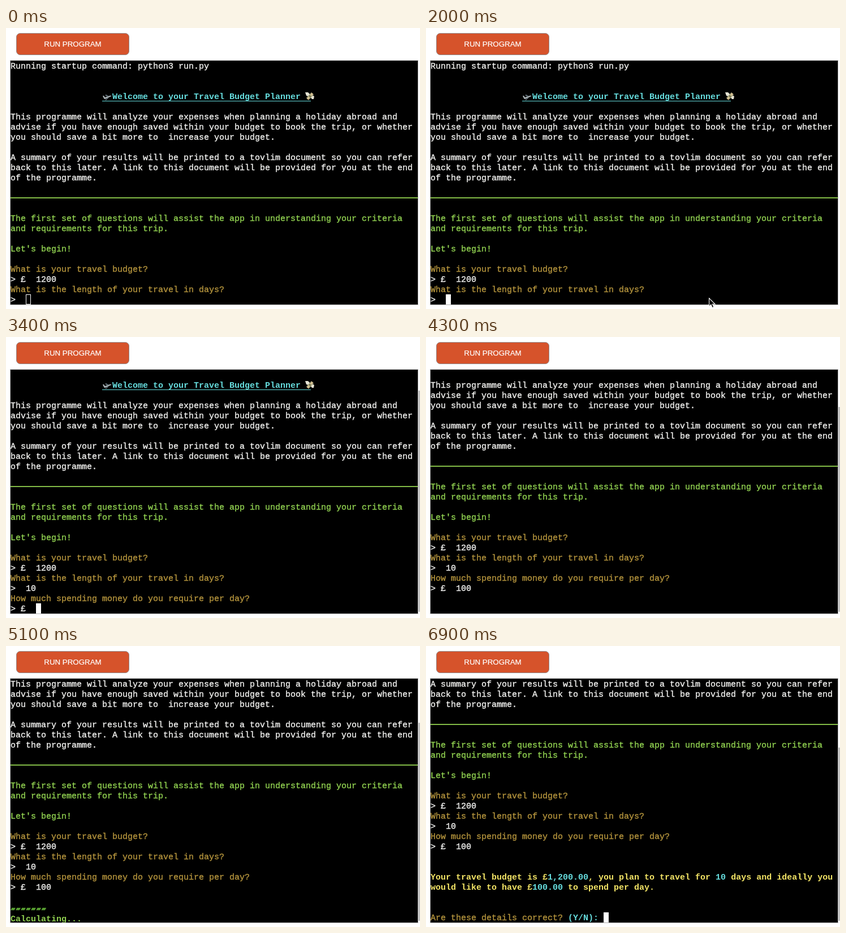
An HTML page for the animation above (7 s loop, 732 px wide and 498 px high).

```html
<!DOCTYPE html>
<html lang="en">
<head>
<meta charset="utf-8">
<title>Travel Budget Planner</title>
<style>
  html, body { margin: 0; width: 100%; height: 100%; overflow: hidden; background: #fff; }
  #stage { position: relative; width: 732px; height: 498px; overflow: hidden; }
  #stage div, #stage svg { position: absolute; }
  #button {
    left: 18px; top: 9px; width: 200px; height: 39px; box-sizing: border-box;
    border: 1px solid #90898b; border-radius: 7px; background: #d6532b;
    color: #fff; font: 13.333px/37px "Liberation Sans", Arial, sans-serif; text-align: center;
    -webkit-text-stroke: .2px;
  }
  #terminal { left: 8px; top: 58px; width: 720px; height: 432px; overflow: hidden; background: #000; }
  #edge { left: 7px; top: 57px; width: 720px; height: 432px; border: 1px solid #b4b4b4; }
  #scroller { left: 0; top: 0; width: 720px; }
  pre {
    position: relative; top: 2px; margin: 0; color: #f0f0ee;
    font: 15px/18px "Liberation Mono", "Courier New", monospace; -webkit-text-stroke: .4px;
  }
  b { -webkit-text-stroke: 0; }
  .green { color: #90d050; }
  .gold { color: #b2923c; }
  .cyan { color: #66dcdd; }
  .yellow { color: #f4e566; }
  .bar { color: #569b30; font-family: "DejaVu Sans Mono", monospace; -webkit-text-stroke: 0; }
  #rule { left: 0; top: 242px; width: 720px; height: 2px; background: #82bb46; }
  #underline { left: 162px; top: 71px; width: 369px; height: 1px; background: #66dcdd; }
  #plane { left: 162px; top: 58px; }
  #money { left: 520px; top: 54px; }
  #cursor { top: 414px; width: 9px; height: 18px; box-sizing: border-box; border: 1px solid #fff; }
  #thumb { left: 728px; width: 8px; border-radius: 2px; background: #c1c1c1; }
</style>
</head>
<body>
<div id="stage">
  <div id="button">RUN PROGRAM</div>
  <div id="edge"></div>
  <div id="terminal">
    <div id="scroller">
<pre>Running startup command: python3 run.py


                    <b class="cyan">Welcome to your Travel Budget Planner</b>

This programme will analyze your expenses when planning a holiday abroad and
advise if you have enough saved within your budget to book the trip, or whether
you should save a bit more to  increase your budget.

A summary of your results will be printed to a tovlim document so you can refer
back to this later. A link to this document will be provided for you at the end
of the programme.



<span class="green">The first set of questions will assist the app in understanding your criteria
and requirements for this trip.

Let's begin!</span>

<span class="gold">What is your travel budget?</span>
&gt; £  1200
<span class="gold">What is the length of your travel in days?</span></pre>
      <pre id="log"></pre>
      <div id="rule"></div>
      <div id="underline"></div>
      <svg id="plane" width="18" height="14">
        <path d="M1 4l2 0 2 3 8-3q4-1 3 1l-11 5q-2 0-4-6z" fill="#a9b2b5"/>
        <path d="M5 3l2-1 5 3-3 1zM9 8l3-1-5 5-2 0z" fill="#64727a"/>
      </svg>
      <svg id="money" width="18" height="18">
        <path d="M1 2l5 0 4 4-4 3-3-1zM9 9l4-2 4 2-1 5-3 0z" fill="#e6e4d5"/>
        <path d="M3 12l9-10 4 4-9 10z" fill="#a8a27c"/>
        <path d="M5 14l9-10" stroke="#e0c795" stroke-width="2"/>
        <circle cx="9.500" cy="9" r="1.700" fill="#6d7450"/>
      </svg>
    </div>
    <div id="cursor"></div>
  </div>
  <div id="thumb"></div>
  <svg id="pointer" width="14" height="20" style="left:0;top:0">
    <path d="M.6 .8v14.500l3.300-3.100 2.300 5.500 2.600-1.100-2.300-5.300h4.600z" fill="#000" stroke="#fff" stroke-width="1.100"/>
  </svg>
</div>
<script>
const LOOP = 7000, STEP = 100, ROWS = 24;
const CLICK = 1500, DAYS_SENT = 3000, SPEND_SENT = 4300, CALCULATE = 4700, RESULT = 6600;
const [log, scroller, cursor, thumb, pointer] =
  ["log", "scroller", "cursor", "thumb", "pointer"].map(id => document.getElementById(id));

const clamp = (v, lo, hi) => Math.min(hi, Math.max(lo, v));
const typed = (text, t, start) => text.slice(0, clamp(Math.floor((t - start) / 200) + 1, 0, text.length));
const paint = (name, text) => `<span class="${name}">${text}</span>`;
const cyan = text => paint("cyan", text);

function spinner(t) {
  const filled = Math.floor((t - CALCULATE) / STEP + 2) % 7 + 1;
  return paint("bar", "▰".repeat(filled) + "▱".repeat(7 - filled));
}

function terminalState(t) {
  const days = typed("10", t, 2300), spend = typed("100", t, 3600);
  const lines = ["&gt;  " + days];
  if (t < DAYS_SENT) return { lines, scroll: 0, column: 3 + days.length };

  lines.push(paint("gold", "How much spending money do you require per day?"), "&gt; £  " + spend);
  if (t < SPEND_SENT) return { lines, scroll: 2, column: 5 + spend.length };
  if (t < CALCULATE) return { lines, scroll: 4 };

  if (t < RESULT) {
    lines.push("", spinner(t), `<b class="green">Calculating...</b>`);
    return { lines, scroll: 5 };
  }
  lines.push("", "",
    `<b class="yellow">Your travel budget is £${cyan("1,200.00")}, you plan to travel for ${cyan("10")} days and ideally you`,
    `would like to have £${cyan("100.00")} to spend per day.</b>`, "", "",
    paint("gold", "Are these details correct? ") + `<b class="cyan">(Y/N):</b>`);
  return { lines, scroll: 9, column: 34 };
}

function drawPointer(t) {
  const left = 1 - clamp((t - 500) / 600, 0, 1);
  const offset = left * left;
  pointer.style.display = t >= 500 && t < 2300 ? "" : "none";
  pointer.style.transform = `translate(${500 + 14 * offset}px, ${478 + 21 * offset}px)`;
}

function draw(t) {
  const { lines, scroll, column } = terminalState(t);
  log.innerHTML = lines.join("\n");
  scroller.style.top = -18 * scroll + "px";

  cursor.style.display = column ? "" : "none";
  cursor.style.left = 9 * column + "px";
  cursor.style.background = t < CLICK ? "none" : "#fff";

  const top = 62 + 432 * scroll / (ROWS + scroll);
  thumb.style.display = scroll ? "" : "none";
  thumb.style.top = top + "px";
  thumb.style.height = 487 - top + "px";
  drawPointer(t);
}

const start = performance.now();
let shown = -1;
function tick() {
  const t = Math.floor((performance.now() - start) % LOOP / STEP) * STEP;
  if (t !== shown) draw(shown = t);
  requestAnimationFrame(tick);
}
tick();
</script>
</body>
</html>
```
